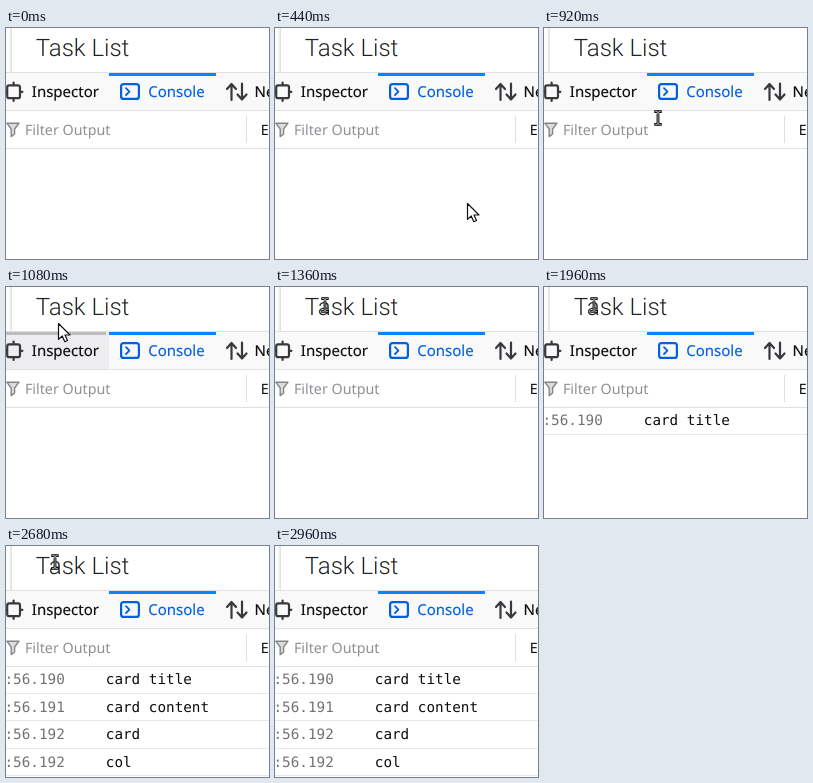
Recreate the animation shown at these times as an HTML page. Size 263 by 231 pixels, loop 4000 ms.

```html
<!DOCTYPE html>
<html lang="en">
<head>
<meta charset="utf-8">
<title>Console demo</title>
<style>
  html, body { margin: 0; width: 100%; height: 100%; overflow: hidden; background: #fff; }
  svg { display: block; width: 263px; height: 231px; }
  text { text-rendering: geometricPrecision; white-space: pre; }
  .title { font: 300 24px Roboto, sans-serif; isolation: isolate; }
  .title text { mix-blend-mode: multiply; }
  .tab { font: 15px "Noto Sans", sans-serif; fill: #0c0c0d; stroke: #0c0c0d; stroke-width: .15; }
  .tab.on { fill: #0060df; stroke: #0060df; }
  .bar { font: 14.3px "Noto Sans", sans-serif; fill: #0c0c0d; }
  .hint { fill: #8f8f94; }
  .log { font: 14.3px "DejaVu Sans Mono", monospace; fill: #0c0c0d; }
  .time { fill: #737373; }
  .icon { fill: none; stroke: #38383d; stroke-width: 2.2; stroke-linecap: round; stroke-linejoin: round; }
  .line { fill: #e0e0e2; }
  .log .line { fill: #e7e7e9; }
</style>
</head>
<body>
<svg viewBox="0 0 263 231">
  <defs>
    <linearGradient id="shade">
      <stop offset="0" stop-color="#fff"/>
      <stop offset="1" stop-color="#dcdcdc"/>
    </linearGradient>
    <path id="stem" d="M-2.3-6.4H-1L0-5.6 1-6.4H2.3M0-5.6V5.6M-2.3 6.4H-1L0 5.6 1 6.4H2.3"/>
  </defs>
  <rect width="263" height="231" fill="#fff"/>
  <rect x="3" width="3" height="44" fill="url(#shade)"/>
  <!-- one layer per colour channel gives LCD-style edges -->
  <g class="title">
    <text x="29.5" y="28" fill="#ffff21" aria-hidden="true">Task List</text>
    <text x="29.75" y="28" fill="#ff21ff">Task List</text>
    <text x="30" y="28" fill="#21ffff" aria-hidden="true">Task List</text>
  </g>

  <rect y="44" width="263" height="39" fill="#f9f9fa"/>
  <rect class="line" y="44" width="263" height="1"/>
  <g id="hover">
    <rect y="45" width="103" height="37" fill="#ededf0"/>
    <rect y="45" width="100" height="3" fill="#bcbcbe"/>
  </g>
  <rect x="103" y="45" width="107" height="3" fill="#0a84ff"/>
  <rect class="line" y="82" width="263" height="1"/>

  <g class="icon">
    <rect x="1.2" y="57.4" width="12.8" height="12.8" rx="2"/>
    <path d="M7.6 54.5V57M7.6 70.5V73M-1 63.8H1M14.2 63.8H16.4"/>
    <path d="M225.5 72V56.5M221 61L225.5 56 230 61M236 55.5V71M231.5 66.5L236 71.5 240.5 66.5"/>
    <g stroke="#0060df">
      <rect x="115.1" y="56.1" width="17.8" height="14.8" rx="2.5"/>
      <path d="M120 60.2L123.4 63.6 120 67" stroke-width="1.8"/>
    </g>
    <path d="M.8 95.2H13L8.6 101V106L5.2 108.6V101Z" fill="#dcdcde" stroke="#858589" stroke-width="1.4"/>
  </g>
  <text class="tab" x="25.8" y="69">Inspector</text>
  <text class="tab on" x="142.2" y="69">Console</text>
  <text class="tab" x="248.6" y="69">Ne</text>

  <text class="bar hint" x="18.9" y="107">Filter Output</text>
  <rect class="line" x="240" y="88" width="1" height="27"/>
  <text class="bar" x="254.7" y="107">E</text>
  <rect class="line" y="120" width="263" height="1"/>

  <g id="logs"></g>

  <g id="cursor">
    <path id="arrow" d="M.5.5V16.4L4.2 13 6.8 18.7 9.5 17.5 7 12H12Z"
      fill="#fff" stroke="#111" stroke-width="1.2" stroke-linejoin="round"/>
    <g id="beam" fill="none" stroke-linecap="square">
      <use href="#stem" stroke="#000" stroke-width="2.8"/>
      <use href="#stem" stroke="#fff" stroke-width=".7"/>
    </g>
  </g>
</svg>
<script>
const LOOP = 4000, STEP = 40;
const $ = id => document.getElementById(id);
const show = (el, on) => el.setAttribute("visibility", on ? "inherit" : "hidden");

const entries = [
  ["190", "card title", 1960],
  ["191", "card content", 2040],
  ["192", "card", 2040],
  ["192", "col", 2040]
];
$("logs").innerHTML = entries.map(([ms, label], i) => {
  const y = Math.round(138 + 27.6 * i);
  return `<g class="log"><text class="time" x="-1.5" y="${y}">:56.${ms}</text>` +
    `<text x="99.8" y="${y}">${label}</text>` +
    `<rect class="line" y="${Math.floor(147.2 + 27.4 * i)}" width="263" height="1"/></g>`;
}).join("");
const rows = [...$("logs").children];

// [time, x, y] of the pointer's hot spot
const path = [
  [280, 217, 223], [400, 199, 188], [520, 178, 148], [600, 165, 127],
  [680, 152, 116], [760, 141, 112], [840, 141, 112], [960, 101, 79],
  [1080, 52, 36], [1160, 46, 25], [1240, 47, 20], [1360, 50, 18],
  [2640, 50, 18], [2680, 49, 16], [2800, 41, 9], [2920, 24, -4]
];

function pointer(t) {
  const i = path.findIndex(p => p[0] >= t);
  const b = path[i], a = path[Math.max(0, i - 1)];
  const k = b === a ? 0 : (t - a[0]) / (b[0] - a[0]);
  return [a[1] + (b[1] - a[1]) * k, a[2] + (b[2] - a[2]) * k];
}

function draw(ms) {
  const t = Math.floor((ms % LOOP) / STEP) * STEP;
  rows.forEach((row, i) => show(row, t >= entries[i][2]));
  show($("hover"), t >= 960 && t < 1120);

  const visible = t >= 280 && t < 2960;
  show($("cursor"), visible);
  if (!visible) return;
  const [x, y] = pointer(t).map(Math.round);
  const text = (y > 82 && y < 121) || (y > 5 && y < 30);
  show($("beam"), text);
  show($("arrow"), !text);
  $("cursor").setAttribute("transform", `translate(${x} ${y})`);
}

const start = performance.now();
function tick() {
  draw(performance.now() - start);
  requestAnimationFrame(tick);
}
tick();
</script>
</body>
</html>
```
